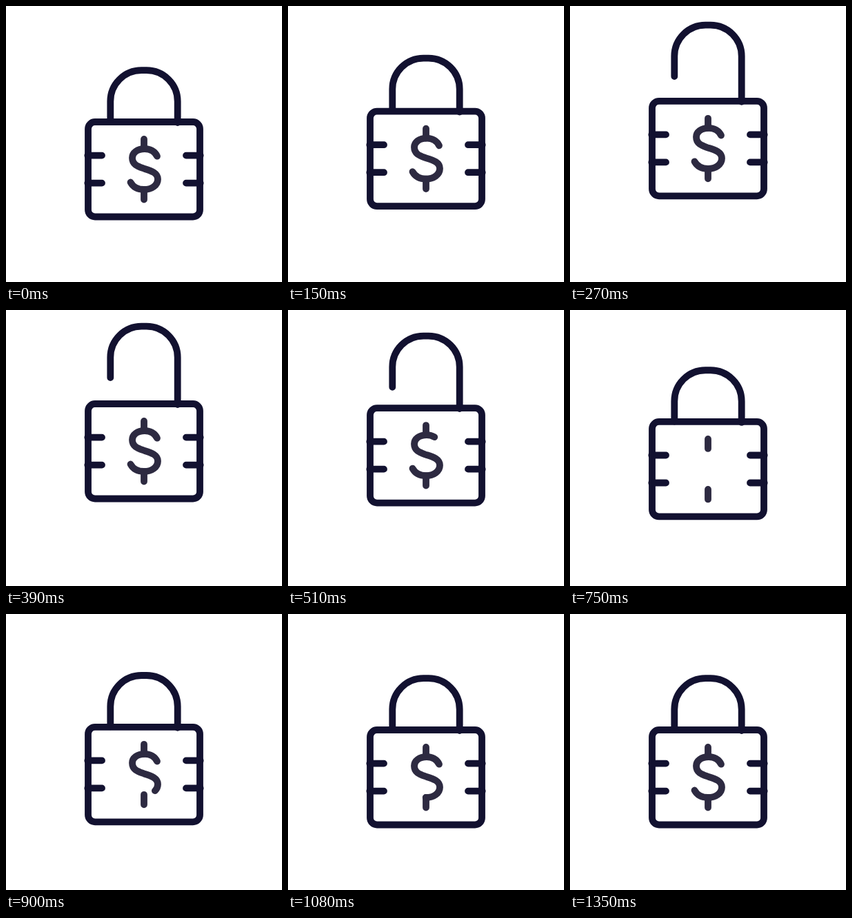
An HTML page for the animation above (1410 ms loop, 400 px wide and 400 px high).

```html
<!DOCTYPE html>
<html lang="en">
<head>
<meta charset="utf-8">
<title>Padlock</title>
<style>
  html, body { margin: 0; height: 100%; overflow: hidden; background: #fff; }
  svg { display: block; width: 100%; height: 100%; fill: none; stroke-width: 9.8; stroke-linecap: round; stroke-linejoin: round; }
</style>
</head>
<body>
<svg viewBox="0 0 400 400">
  <g id="lock">
    <g stroke="#121130">
      <path id="shackle"/>
      <rect x="119" y="168" width="162" height="137.5" rx="10"/>
      <path d="M118.3 216.6h20.7M118.3 256.6h20.7M281.7 216.6h-20.7M281.7 256.6h-20.7"/>
    </g>
    <g stroke="#2d2a41">
      <path d="M200 193v14M200 266v14.5"/>
      <path id="curl" pathLength="1" d="M219 217.7C216 211 209 207 201 207C190 207 183 213 183 220C183 231 193 233 201 236C211 239 220 242 220 251C220 260 211 266 200 266C191 266 184 262 180.5 255.5"/>
    </g>
  </g>
</svg>
<script>
const LOOP = 1410, STEP = 30, END = 1350;
const [lock, shackle, curl] = ['lock', 'shackle', 'curl'].map(id => document.getElementById(id));

// Progress from 0 to 1 between two times, and eased versions of it
const ramp = (t, from, to) => Math.min(1, Math.max(0, (t - from) / (to - from)));
const smooth = (t, from, to) => { const u = ramp(t, from, to); return u * u * (3 - 2 * u); };
const speedUp = (t, from, to, power) => ramp(t, from, to) ** power;
const slowDown = (t, from, to, power) => 1 - (1 - ramp(t, from, to)) ** power;

// cubic-bezier(1, .35, 1, .25): steady start, abrupt finish
function rush(x) {
  const v = Math.cbrt(1 - x), u = 1 - v;
  return 1.05 * u * v * v + 0.75 * u * u * v + u ** 3;
}

// Crouch, leap, drop, rebound, settle
const hop = t => 14 * smooth(t, 0, 60)
  - 46 * slowDown(t, 60, 390, 3.2)
  + 46 * speedUp(t, 390, 570, 5)
  - 20.5 * slowDown(t, 570, 780, 2)
  + 6.5 * smooth(t, 780, 1080);

// Spring open, snap shut slightly too deep, settle
const lift = t => -37.5 * smooth(t, 125, 295)
  + 39.5 * speedUp(t, 390, 570, 4)
  - 2 * smooth(t, 570, 780);

function draw(t) {
  const open = lift(t);
  lock.setAttribute('transform', `translate(0 ${hop(t)})`);
  shackle.setAttribute('d', `M151.3 ${167.5 + open}V${138.2 + open}a45 45 0 0 1 45-45h7.4a45 45 0 0 1 45 45V169`);

  // The curl is wiped from its top end, then redrawn from there
  const wiping = t < 750;
  const from = wiping ? rush(ramp(t, 450, 750)) : 0;
  const to = wiping ? 1 : 1 - rush(1 - ramp(t, 750, END));
  curl.style.display = to - from > 0.001 ? '' : 'none';
  curl.setAttribute('stroke-dasharray', `${to - from} 2`);
  curl.setAttribute('stroke-dashoffset', -from);
}

const start = performance.now();
function tick() {
  const t = (performance.now() - start) % LOOP;
  draw(Math.min(END, Math.floor(t / STEP) * STEP));
  requestAnimationFrame(tick);
}
tick();
</script>
</body>
</html>
```
